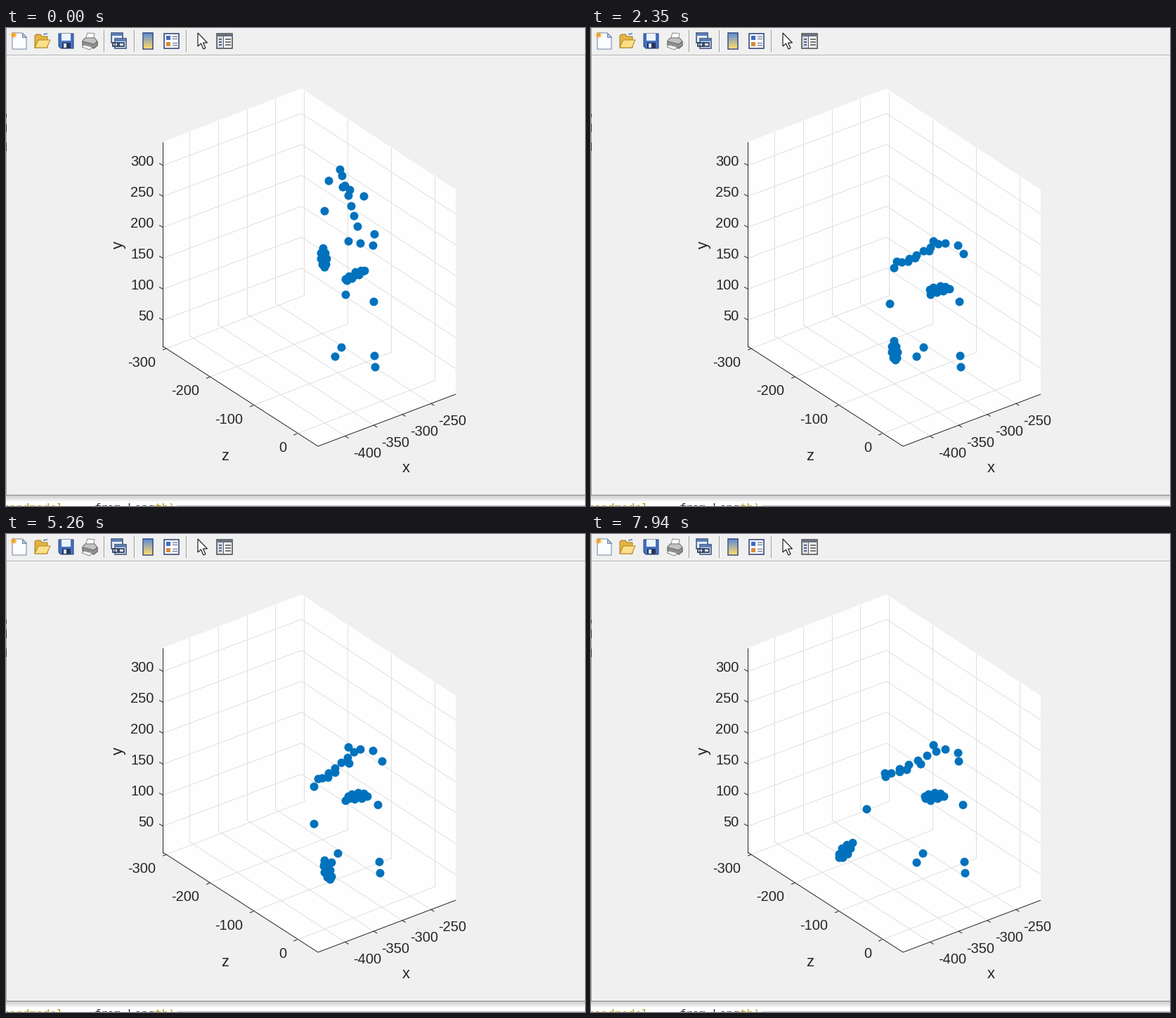
A matplotlib script that plays this animation: 824 by 680 pixels, repeating every 7990 ms.

```python
import numpy as np
import matplotlib.pyplot as plt
from matplotlib.animation import FuncAnimation
from matplotlib.patches import Polygon, Rectangle

W, H, DPI = 824, 680, 64
PT = 72 / DPI
FRAMES, STEP = 170, 47
INK, GRID, DOT = "#262626", "#dfdfdf", "#0072bd"

plt.rcParams["font.family"] = "Liberation Sans"
fig = plt.figure(figsize=(W / DPI, H / DPI), dpi=DPI, facecolor="#f0f0f0")
ax = fig.add_axes([0, 0, 1, 1])
ax.set_xlim(0, W)
ax.set_ylim(H, 0)
ax.axis("off")


# ---- drawing helpers (pixel units, y down) ----
def rect(x, y, w, h, fill, edge="none", lw=1):
    ax.add_patch(Rectangle((x, y), w, h, fc=fill, ec=edge, lw=lw * PT))


def poly(pts, fill, edge="none", lw=1):
    ax.add_patch(Polygon(pts, closed=True, fc=fill, ec=edge, lw=lw * PT))


def line(a, b, color, lw=1.0):
    ax.plot([a[0], b[0]], [a[1], b[1]], color=color, lw=lw * PT,
            solid_capstyle="butt")


def label(x, y, s, size=20, ha="left", color=INK, **kw):
    ax.text(x, y, s, fontsize=size * PT, ha=ha, va="baseline", color=color, **kw)


# ---- window frame ----
def draw_window():
    rect(0, 38, W, 1, "#b2b2b2")
    rect(0, 39, W, 1, "#f8f8f8")
    for i in range(15):
        rect(0, 665 + i, W, 1, str(min(1, 0.80 + 0.022 * i)))
    rect(0, 664, W, 1, "#8a8a8a")
    rect(0, 0, 1, 664, "#a6a6a6")
    for y, h in ((122, 5), (136, 12), (163, 12)):
        rect(0, y, 1, h, "#3c3c3c")
    mono = dict(family="DejaVu Sans Mono", size=16)
    label(-5, 688, "handmodel", color="#b59a1e", **mono)
    label(126, 688, "from.Leng", color="#333333", **mono)
    label(212, 688, "th)", color="#b59a1e", **mono)
    rect(243, 679, W - 243, 1, "#c4c4c4")


def draw_toolbar():
    for x in (139, 182, 256):
        rect(x, 3, 1, 31, "#9a9a9a")
        rect(x + 1, 3, 1, 31, "#fbfbfb")
    # new page
    poly([(9, 7), (23, 7), (29, 13), (29, 30), (9, 30)], "#fbfdff", "#6f84a3")
    poly([(23, 7), (23, 13), (29, 13)], "#b9cbe3", "#6f84a3")
    k = np.arange(16)
    rad = np.where(k % 2, 2.2, 5.5)
    poly(np.c_[11 + rad * np.cos(k * np.pi / 8),
               10 + rad * np.sin(k * np.pi / 8)], "#f2a51f")
    # open folder
    poly([(41, 28), (41, 11), (43, 9), (49, 9), (51, 12), (59, 12), (59, 28)],
         "#e3b444", "#a97b1c")
    poly([(41, 28), (46, 17), (63, 17), (58, 28)], "#fbe08a", "#b4851f")
    line((53, 9), (59, 8), "#4d7bb5", 1.5)
    # floppy
    poly([(75, 8), (96, 8), (96, 29), (78, 29), (75, 26)], "#4472c0", "#28457f")
    rect(79, 8, 13, 10, "#eef4fc")
    rect(80, 21, 12, 8, "#26365c")
    rect(82, 22, 4, 6, "#dce4f0")
    # printer
    poly([(113, 16), (116, 7), (126, 8), (124, 17)], "#ffffff", "#8b8b8b")
    poly([(109, 18), (113, 14), (126, 14), (130, 19), (130, 25), (125, 29),
          (109, 24)], "#c2c2c2", "#6c6c6c")
    poly([(109, 19), (125, 23), (130, 19), (130, 25), (125, 29), (109, 24)],
         "#8f8f8f", "#666666")
    poly([(111, 24), (123, 27), (119, 31), (108, 27)], "#f5f5f5", "#8b8b8b")
    # linked windows
    for x, y in ((150, 7), (155, 15)):
        rect(x, y, 16, 14, "#e4edf8", "#3f5580", 1.6)
        rect(x + 1, y + 1, 14, 3, "#557fbd")
    for x in (152, 159):
        rect(x, 21, 9, 5, "none", "#2f3f5c", 1.8)
    # colour bar
    blue, gold = np.array((.36, .55, .85)), np.array((.99, .85, .42))
    for i in range(22):
        rect(196, 7 + i, 13, 1.1, tuple(blue + (gold - blue) * i / 21))
    rect(195.5, 6.5, 14, 23, "none", "#33477a", 1.5)
    # legend box
    rect(225, 7.5, 21, 21, "#fbfcff", "#33477a", 1.6)
    for y, c in ((11, "#3f6cc0"), (20, "#d98a3c")):
        rect(228, y, 6, 6, c)
        rect(237, y + 1, 7, 1, "#555f78")
        rect(237, y + 4, 7, 1, "#555f78")
    # pointer
    poly([(273, 7), (273, 26), (277.5, 22), (281, 30), (284, 28.5),
          (280.5, 21), (286.5, 21)], "#ffffff", "#1e1e1e", 1.2)
    # property panel
    rect(300.5, 7.5, 22, 21, "#fafafa", "#454545", 1.5)
    rect(301, 8, 21, 4, "#69717f")
    rect(301, 12, 8, 16, "#d5dbe6")
    rect(309, 12, 1, 16, "#5b5b5b")
    for y in (15, 19, 23):
        rect(303, y, 4, 2, "#56657f")
        rect(312, y, 8, 1.5, "#777777")


# ---- 3-D axes box ----
def draw_axes():
    poly([(223.5, 162), (420.5, 86), (640, 230), (640, 521), (444, 595),
          (223.5, 453)], "#fefefe")
    for i in range(4):
        zx, zy = 228 + 62 * i, 456 + 40.4 * i
        fx, fy = zx + 196.5, zy - 75.5
        line((zx, zy), (fx, fy), GRID)
        line((fx, fy), (fx, fy - 291), GRID)
        line((zx, zy), (zx - 5, zy + 2), INK)
        xx, xy = 261.5 + 40.6 * i, 438 - 15.5 * i
        gx, gy = xx + 221, xy + 142.5
        line((xx, xy - 291), (xx, xy), GRID)
        line((xx, xy), (gx, gy), GRID)
        line((gx, gy), (gx + 5, gy + 3), INK)
        label(494 + 40.5 * i, 611 - 15.4 * i, str(-400 + 50 * i))
        label(213 + 62 * i, 482 + 40.4 * i, str(-300 + 100 * i), ha="right")
    for i in range(6):
        y = 415.5 - 44 * i
        line((223.5, y), (420.5, y - 74), GRID)
        line((420.5, y - 74), (640, y + 69), GRID)
        line((223.5, y), (218, y - 3), INK)
        label(210.5, 416 - 44 * i, str(50 + 50 * i), ha="right")
    line((223.5, 162), (223.5, 453.5), INK)
    line((223.5, 453), (444, 595), INK)
    line((444, 595), (640, 521), INK)
    label(311.5, 615, "z", 22, "center")
    label(569.5, 632, "x", 22, "center")
    ax.text(160, 308, "y", fontsize=22 * PT, rotation=90, color=INK,
            ha="center", va="center")


# ---- figure that bends forward, then swings its hanging left arm ----
SEG_LEN = np.array([24, 14.5, 14.5, 14.5, 14, 14, 9])     # pelvis to head
SEG_BEND = np.array([.83, 1, 1, 1, 1, 1, .78])
SEG_SIZE = np.array([1, 1, 1, 1, 1, 1, .65])
ROUND = np.arange(8) * np.pi / 4


def vec(x, y):
    return np.array([x, y], float)


def smooth(t, start, end):
    s = np.clip((t - start) / (end - start), 0, 1)
    return s * s * (3 - 2 * s)


def hand(wrist, along, across):
    """Wrist, palm centre and an oval of finger joints."""
    a = np.r_[0, .57, .57 - .43 * np.cos(ROUND)]
    b = np.r_[0, -.1, -.1 + .5 * np.sin(ROUND)]
    return wrist + np.outer(a, along) + np.outer(b, across)


def pose(t):
    lift = np.sin(np.pi / 2 * min(t / 3110, 1))
    angle = np.radians(120) * lift
    cos, sin = np.cos(angle), np.sin(angle)
    reach = max(0, -2 * cos)                 # grows once past horizontal
    sway = smooth(t, 3110, 4300) - 2.85 * smooth(t, 4600, 7330)
    stance = smooth(t, 1580, 5000)

    pelvis = vec(504, 305.5)
    hip = vec(17.5, 3.2 - 1.2 * sway)

    bend = angle * SEG_BEND
    segs = np.c_[SEG_SIZE * (-4.4 - 6.3 * np.sin(bend) + 1.6 * sway),
                 -SEG_LEN * np.cos(bend) + .5 * sway * SEG_SIZE]
    spine = pelvis + np.cumsum(segs, axis=0)

    chest = spine[3] + .75 * segs[4] + vec(1, 4 * reach)
    width = vec(50, -12 + 34 * cos - 6 * sway)
    shoulders = chest + np.outer((-.5, -.1, .1, .5), width)

    elbow_l = shoulders[0] + vec(-6 + 11 * sway, 43 + 11 * reach - 2.3 * sway ** 2)
    wrist_l = elbow_l + vec(-2 + 9 * sin + 14 * sway, 53 - 1.5 * sway ** 2)
    hand_l = hand(wrist_l, vec(2 + 11 * sway, 27 - 1.5 * sway ** 2),
                  vec(8, -4 * sway))

    elbow_r = vec(524 + 8 * reach + 5 * sway, 293 + 30 * lift)
    wrist_r = elbow_r + vec(-14 - 7 * lift, 52 - 2 * lift)
    hand_r = hand(wrist_r, vec(-28, 13 - 12 * lift), vec(-5, 9))

    ankle_l = vec(477 - 5 * lift, 453.5)
    ankle_r = vec(523.5 + 7 * stance, 466)
    legs = [vec(483, 379), ankle_l, ankle_l + vec(-9.5, 13.5),
            vec(522.5 + 6 * stance, 389 - 4 * stance),
            ankle_r, ankle_r + vec(1.5, 15.5)]

    return np.vstack([pelvis, pelvis - hip, pelvis + hip, spine, shoulders,
                      elbow_l, hand_l, elbow_r, hand_r, legs])


draw_window()
draw_toolbar()
draw_axes()
dots = ax.scatter([], [], s=(12 * PT) ** 2, c=DOT, linewidths=0, zorder=5)


def update(i):
    dots.set_offsets(pose(i * STEP) + 0.3)
    return (dots,)


def reset():
    return update(0)


anim = FuncAnimation(fig, update, frames=FRAMES, init_func=reset, interval=STEP,
                     repeat=True, repeat_delay=0, blit=False)
plt.show()
```
